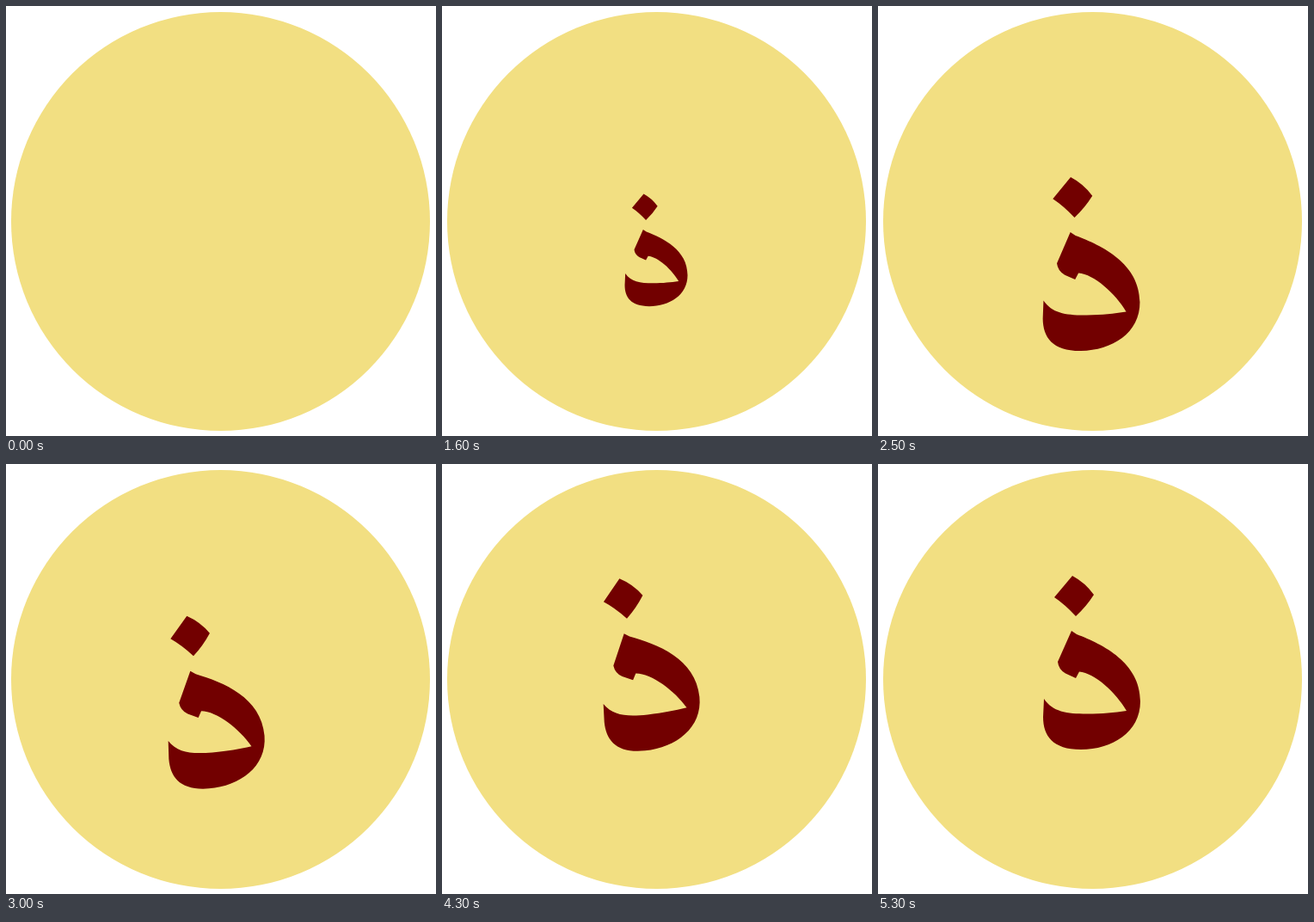
Animation, 500 px wide and 500 px high, one loop 7 s. Source, as an HTML page:

```html
<!DOCTYPE html>
<html lang="ar">
<head>
<meta charset="utf-8">
<title>ذ</title>
<style>
  html, body { margin: 0; width: 100%; height: 100%; overflow: hidden; background: #fff; }
  svg { display: block; width: 100%; height: 100%; }
</style>
</head>
<body>
<svg viewBox="0 0 500 500" role="img" aria-label="ذ">
  <circle cx="249.5" cy="250.5" r="243.5" fill="#f2df82"/>
  <g id="letter" fill="#720000" visibility="hidden">
    <path d="M226 130Q241 138 251 152Q242 166 230 177Q217 163 205 155Z"/>
    <path d="M225 194L231 198C262 210 305 231 305 276C305 312 272 332 236 332
      C203 332 192 316 192 294L193 273C203 288 219 290.5 243 290.5C262 290.5 274 289 289 287
      C277 266 252 243 234 241.5L230 249L218 243.5Q210 239 209 230Z"/>
  </g>
</svg>
<script>
  const LOOP = 7000, STEP = 100;
  const GROWN = 2476;                 // end of the growing and bouncing
  const BASE_X = 250, BASE_Y = 330;   // foot of the letter at rest
  const letter = document.getElementById('letter');

  // [time, height of the foot]
  const bounce = [[0, 400], [825, 213], [1238, 400], [1925, 301], [GROWN, 400], [3900, BASE_Y]];
  // [time, degrees]
  const sway = start => [[start, 0], [start + 407, -10.4], [start + 815, 10.4], [start + 1222, 0]];
  const tilt = [...sway(2478), ...sway(4078)];

  // Linear interpolation through the keys, held at both ends.
  function at(keys, t) {
    const i = keys.findIndex(k => k[0] > t);
    if (i < 0) return keys[keys.length - 1][1];
    if (i === 0) return keys[0][1];
    const [t0, a] = keys[i - 1], [t1, b] = keys[i];
    return a + (b - a) * (t - t0) / (t1 - t0);
  }

  function draw(now) {
    const t = Math.floor(now % LOOP / STEP) * STEP;
    const scale = Math.min(1, t / GROWN);
    letter.setAttribute('visibility', t ? 'visible' : 'hidden');
    letter.setAttribute('transform',
      `translate(${BASE_X} ${at(bounce, t)}) rotate(${at(tilt, t)}) ` +
      `scale(${scale}) translate(${-BASE_X} ${-BASE_Y})`);
  }

  function tick() {
    draw(performance.now());
    requestAnimationFrame(tick);
  }
  tick();
</script>
</body>
</html>
```
